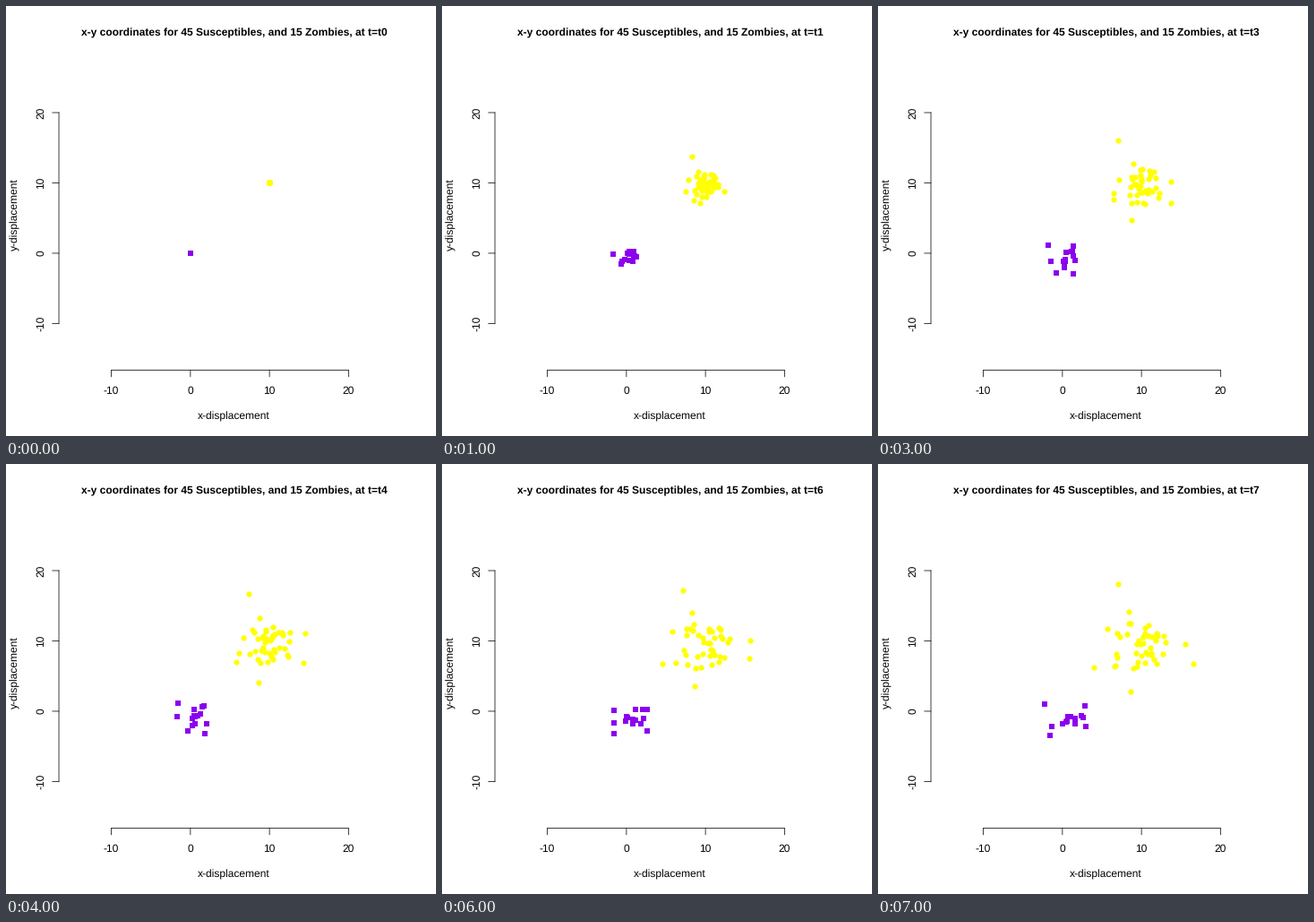
Animation, 480 px wide and 480 px high, one loop 8000 ms. Source, as a matplotlib script:

```python
import matplotlib.pyplot as plt
import numpy as np
from matplotlib.animation import FuncAnimation

plt.rcParams["font.family"] = "Liberation Sans"
plt.rcParams["text.hinting"] = "none"

SIZE, STEPS = 480, 8
PX = 0.72  # points per pixel at 100 dpi
LEFT, RIGHT, TOP, BOTTOM = 59.04, 449.76, 59.04, 406.56  # plot region, pixels
MID, HALF = 5.5, 20.5 * 1.08  # data range of both axes

rng = np.random.default_rng(15)


def spread(n, centre, sd, size=()):
    """Normal values without far outliers."""
    draws = np.clip(rng.normal(size=(*size, n, 2)), -1.8, 1.8)
    return centre + draws * sd


def crowd(n, start, centre, sd, edge):
    """Walkers drifting apart from start; edge holds the outermost end points."""
    ends = np.vstack([edge, spread(n - len(edge), centre, sd)])
    t = np.linspace(0, 1, STEPS)[:, None, None]
    jitter = np.cumsum(spread(n, 0, 0.5, (STEPS,)), axis=0)
    jitter -= jitter[0]
    return start + (ends - start) * np.sqrt(t) + jitter - t * jitter[-1]


people = crowd(45, np.array([10, 10]), (9.8, 9.3), (2.0, 1.8),
               [(7, 18.1), (16.6, 6.8), (8.6, 2.8), (4, 6.3),
                (15.5, 9.5), (8.4, 14.1), (5.7, 11.7)])
zombies = crowd(15, np.array([0, 0]), (0.6, -1.1), (1.3, 0.8),
                [(-2.2, 1), (-1.6, -3.4), (3, -2.2), (2.9, 0.7)])

fig = plt.figure(figsize=(SIZE / 100, SIZE / 100), dpi=100, facecolor="white")
page = fig.add_axes([0, 0, 1, 1])
page.set(xlim=(0, SIZE), ylim=(SIZE, 0))
plot = fig.add_axes([LEFT / SIZE, 1 - BOTTOM / SIZE,
                     (RIGHT - LEFT) / SIZE, (BOTTOM - TOP) / SIZE])
plot.set(xlim=(MID - HALF, MID + HALF), ylim=(MID - HALF, MID + HALF))
for ax in (page, plot):
    ax.axis("off")


def to_x(value):
    return (LEFT + RIGHT) / 2 + (value - MID) / HALF * (RIGHT - LEFT) / 2


def to_y(value):
    return (TOP + BOTTOM) / 2 - (value - MID) / HALF * (BOTTOM - TOP) / 2


def line(xs, ys):
    page.plot(xs, ys, color="black", lw=0.75 * PX, snap=False)


def label(x, y, text, **kw):
    return page.text(x, y, text, fontsize=12 * PX, ha="center", va="baseline",
                     rotation_mode="anchor", **kw)


line((to_x(-10), to_x(20)), (BOTTOM, BOTTOM))
line((LEFT, LEFT), (to_y(-10), to_y(20)))
for value in (-10, 0, 10, 20):
    x, y = to_x(value), to_y(value)
    line((x, x), (BOTTOM, BOTTOM + 7.2))
    line((LEFT - 7.2, LEFT), (y, y))
    label(x, 433, str(value))
    label(42, y, str(value), rotation=90)
label(to_x(MID), 462, "x-displacement")
label(13, to_y(MID), "y-displacement", rotation=90)
title = label(to_x(MID), 34, "", weight="bold")

dots, = plot.plot([], [], "o", color="#FFFF00", ms=6.3 * PX, mew=0,
                  snap=False)
squares, = plot.plot([], [], "s", color="#8B00EE", ms=5.5 * PX, mew=0,
                     snap=False)


def draw(t):
    title.set_text("x-y coordinates for 45 Susceptibles, "
                   f"and 15 Zombies, at t=t{t}")
    dots.set_data(*people[t].T)
    squares.set_data(*zombies[t].T)
    return title, dots, squares


anim = FuncAnimation(fig, draw, frames=STEPS, interval=1000, repeat=True)
plt.show()
```
